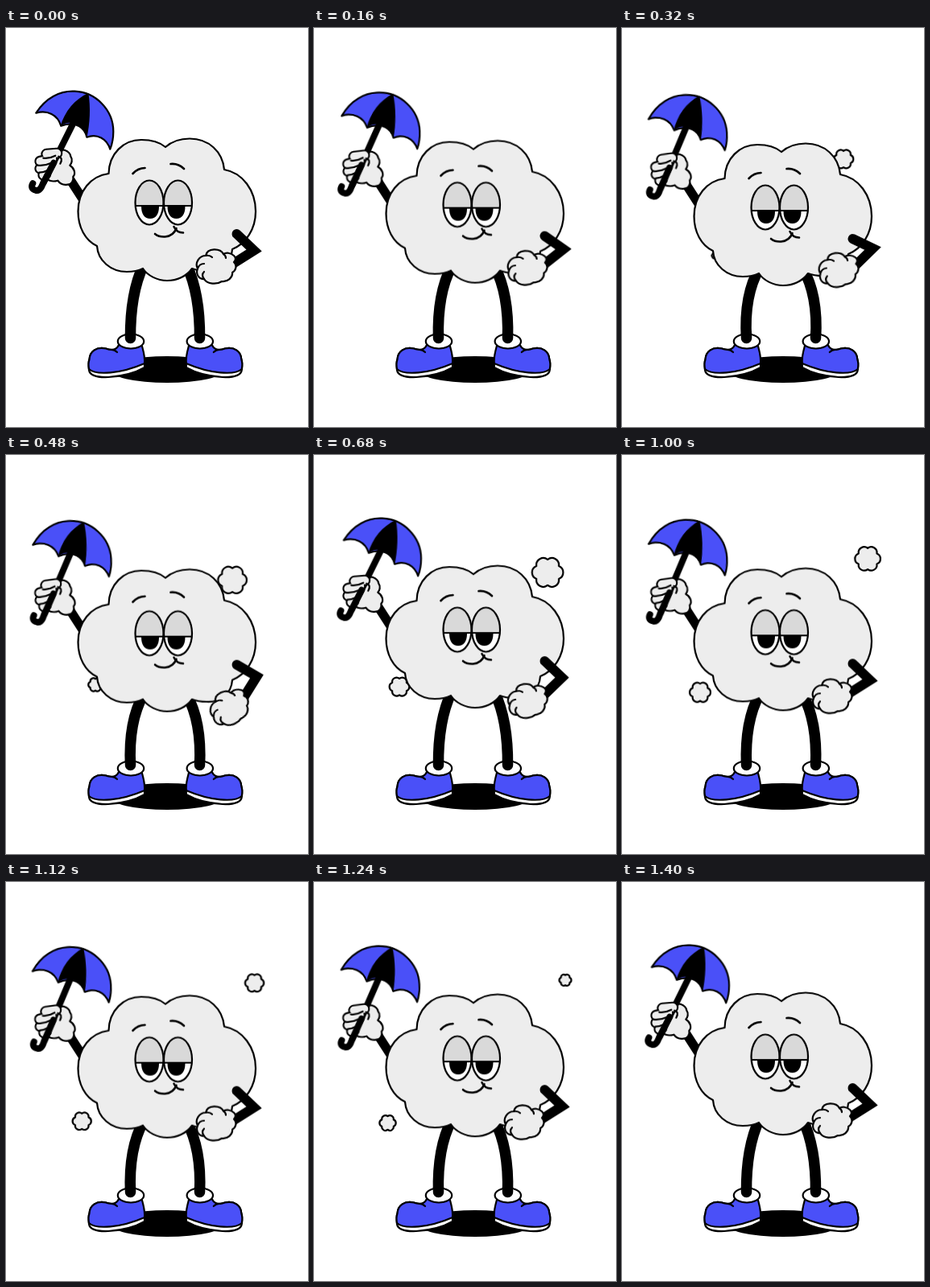
An HTML page for the animation above (1440 ms loop, 375 px wide and 496 px high).

```html
<!DOCTYPE html>
<html lang="en">
<head>
<meta charset="utf-8">
<title>Cloud with umbrella</title>
<style>
  html, body { margin: 0; width: 100%; height: 100%; overflow: hidden; background: #fff; }
  svg { display: block; width: 375px; height: 496px; }

  .line { fill: none; stroke: #000; stroke-width: 2.2; stroke-linecap: round; stroke-linejoin: round; }
  .fog { fill: #ededed; }
  .white { fill: #fff; }
  .blue { fill: #4a50f8; }
  .limb { fill: none; stroke: #000; stroke-width: 13.5; stroke-linecap: round; }
  .bold { stroke-width: 2.6; }

  .bob, .tilt, .arm, .hand, .leg, .brows, .puff { animation: 1440ms infinite; }
  .bob { animation-name: bob; animation-timing-function: cubic-bezier(.37, 0, .63, 1); }
  .tilt { animation-name: tilt; transform-origin: 60px 172px; }
  .arm { animation-name: arm; stroke-width: 12; stroke-linejoin: miter; }
  .hand { animation-name: hand; transform-origin: 261px 296px; }
  .leg { animation-name: leg; animation-timing-function: cubic-bezier(.37, 0, .63, 1); }
  .brows { animation-name: brows; animation-timing-function: ease-in-out; }
  .puff { animation-timing-function: linear; }
  .big { animation-name: big; }
  .small { animation-name: small; }

  @keyframes bob {
    0%, 50%, 100% { transform: translateY(0); }
    25% { transform: translateY(6.2px); }
    75% { transform: translateY(3.8px); }
  }
  @keyframes tilt {
    0%, 50%, 100% { transform: rotate(0deg); animation-timing-function: cubic-bezier(.25, .1, .4, 1); }
    25%, 75% { transform: rotate(-3.9deg); animation-timing-function: cubic-bezier(.6, 0, .75, .9); }
  }
  @keyframes leg {
    0%, 50%, 100% { d: path("M171 294Q154 330 154.500 386"); }
    25% { d: path("M171 298Q151 332 154.500 386"); }
    75% { d: path("M171 297Q152 331 154.500 386"); }
  }
  @keyframes brows {
    0%, 22.2%, 47.2%, 100% { transform: translateY(0); }
    33.3% { transform: translateY(-3px); }
  }
  @keyframes arm {
    0% { d: path("M286.500 256L308 276.500L282 293"); animation-timing-function: ease-in-out; }
    22.2% { d: path("M286.500 256L311.500 268L290 289"); animation-timing-function: linear; }
    33.3% { d: path("M286.500 256L311.500 270.500L295 297"); animation-timing-function: ease-in-out; }
    47.2% { d: path("M286.500 256L308 276.500L286 298"); animation-timing-function: ease-out; }
    52.8%, 100% { d: path("M286.500 256L308 276.500L282 293"); }
  }
  @keyframes hand {
    0% { transform: translate(0, 0) rotate(0deg); animation-timing-function: ease-in-out; }
    22.2% { transform: translate(8px, -2px) rotate(-5deg); animation-timing-function: linear; }
    33.3% { transform: translate(16.5px, 12.5px) rotate(-25deg); animation-timing-function: ease-in-out; }
    47.2% { transform: translate(4.5px, 9px) rotate(-8deg); animation-timing-function: ease-out; }
    52.8%, 100% { transform: translate(0, 0) rotate(0deg); }
  }
  @keyframes big {
    0%, 11% { transform: translate(267px, 172px) scale(0); }
    22.2% { transform: translate(275px, 163px) scale(.63); }
    33.3% { transform: translate(281px, 155.5px) scale(.92); }
    47.2% { transform: translate(290px, 146px) scale(1); }
    69.4% { transform: translate(305px, 129px) scale(.82); }
    86.1% { transform: translate(312px, 122px) scale(.39); }
    95%, 100% { transform: translate(315px, 119px) scale(0); }
  }
  @keyframes small {
    0%, 15% { transform: translate(118px, 281px) scale(0); }
    22.2% { transform: translate(115px, 283px) scale(.18); }
    33.3% { transform: translate(111px, 285.5px) scale(.45); }
    47.2% { transform: translate(106px, 288px) scale(.64); }
    69.4% { transform: translate(97px, 295px) scale(.67); }
    86.1% { transform: translate(91.5px, 299.5px) scale(.53); }
    96%, 100% { transform: translate(89px, 302px) scale(0); }
  }
</style>
</head>
<body>
<svg viewBox="0 0 375 496">
  <defs>
    <path id="puff" class="line fog" vector-effect="non-scaling-stroke" d="M0-16A8.600 8.600 0 0 1 13.900-8A8.600 8.600 0 0 1 13.900 8A8.600 8.600 0 0 1 0 16A8.600 8.600 0 0 1-13.900 8A8.600 8.600 0 0 1-13.900-8A8.600 8.600 0 0 1 0-16Z"/>
    <g id="foot">
      <path class="line white" d="M140 396C137 401 131 401 124 398.500C112 396 104 402 103.500 412C102 416 102.500 421 103 425C104 433 114 434.500 127 434C142 433 160 429 172 422V410Z"/>
      <path class="line blue" d="M140 394C137 401 131 401 124 398.500C112 396 104 402 103.500 412C102 416 102.500 421 103 424C112 432 142 430 172 417C173 408 170 400 168 392Z"/>
      <path class="line" d="M131 400Q135 400 138 403"/>
      <ellipse class="line white" cx="155" cy="389.500" rx="16.200" ry="9"/>
    </g>
    <g id="eye">
      <ellipse class="white" rx="17.500" ry="27.500"/>
      <path fill="#d9d9d9" d="M-17.400 4A17.500 27.500 0 1 1 17.400 4Z"/>
      <ellipse class="line" rx="17.500" ry="27.500"/>
      <path class="line" d="M-17 4H17"/>
    </g>
    <path id="pupil" d="M-11 5H11C11 14 7 20 0 20S-11 14-11 5Z"/>
    <g id="fingers">
      <path d="M47 182L50 181"/>
      <path d="M43 174L53 171"/>
      <path d="M43 165L58 162"/>
      <path d="M51 156L64 155"/>
    </g>
  </defs>

  <ellipse cx="200" cy="424.500" rx="72" ry="16.500"/>
  <path class="limb leg" d="M171 294Q154 330 154.500 386"/>
  <g transform="matrix(-1 0 0 1 395 0)">
    <path class="limb leg" d="M171 294Q154 330 154.500 386"/>
  </g>
  <use href="#foot"/>
  <use href="#foot" transform="matrix(-1 0 0 1 395.800 0)"/>
  <path class="limb" d="M154.500 380V385.500M240.500 380V385.500"/>

  <g class="puff big"><use href="#puff"/></g>
  <g class="puff small"><use href="#puff"/></g>

  <g class="bob">
    <path class="limb" style="stroke-width:11.500" d="M98 217L80 189"/>

    <g class="tilt">
      <g transform="translate(-.7 .7)">
        <path class="line blue" d="M38 105C50 86 68 77 86 78C112 79 134 101 134 128C134 138 132 145 130 150C126 137 114 130 101 135C99 124 88 114 69 121C65 107 52 101 38 105Z"/>
        <path d="M103 80C86 88 74 102 68 122C73 117 79 116 85 118C93 120 98 126 101 136C105 118 106 98 103 80Z"/>
        <path class="line fog" d="M62 152C70 148 80 152 81 159C84 163 82 168 80 170C85 173 88 180 84 184C85 189 82 194 77 194C71 195 67 192 65 189C58 191 51 189 50 184Z"/>
        <path class="limb" style="stroke-width:8" d="M84.500 117L46 194C43.500 201 40 202 37.500 201C33 200 31.500 197 34 192.500"/>
        <use href="#fingers" class="line" style="stroke-width:14"/>
        <use href="#fingers" style="fill:none;stroke:#ededed;stroke-width:9.800;stroke-linecap:round"/>
        <path class="line" d="M47 161Q54 162 62 158M40 170Q48 171 57 167M42 179Q47 179 53 176M66 159Q72 161 68 168"/>
        <path class="limb" style="stroke-width:8" d="M60 167L47 192"/>
      </g>
    </g>

    <path class="line fog" d="M127.500 181C128 156 146 139 168 139C180 139 191 142 198 148C206 141 216 137.500 228 137.500C252 137.500 269 154 271 176C294 180 310 202 310 228C310 250 298 268 281 275C280 292 266 303 249 302C243 302 236 301 231 299C224 309 212 314 200 314C188 314 176 308 170 299C164 302 157 303 150 303C130 303 114 289 113 271C98 264 89.500 247 89.500 228C89.500 203 105 184 127.500 181Z"/>

    <use href="#eye" x="178" y="217"/>
    <use href="#eye" x="213.500" y="217"/>
    <use href="#pupil" x="179" y="217"/>
    <use href="#pupil" x="211.500" y="217"/>
    <path class="line bold brows" d="M157.500 181Q164 174 172.500 174M204.500 169Q214 168 221 175"/>
    <path class="line bold" d="M185 256Q190 260 197.500 259.500Q208 258.500 211.500 249M208.500 247Q212 254.500 220 254.500"/>

    <path class="limb arm" d="M286.500 256L308 276.500L282 293"/>
    <g class="hand">
      <path class="line fog" d="M283 283C279 279 273 279 270 281C266 273.500 250 273 248 283C240 283 234 292 238 299C235 306 240 313 246 312C250 319 262 319 268 315C275 316 282 310 281 304C286 301 287 295 283 291C286 288 285 285 283 283Z"/>
      <path class="line" d="M248 283Q253 282 256 285M238 299Q240 293 246 293M246 312Q242 307 246 303M270 281Q273 283 273 286"/>
    </g>
  </g>
</svg>
</body>
</html>
```
